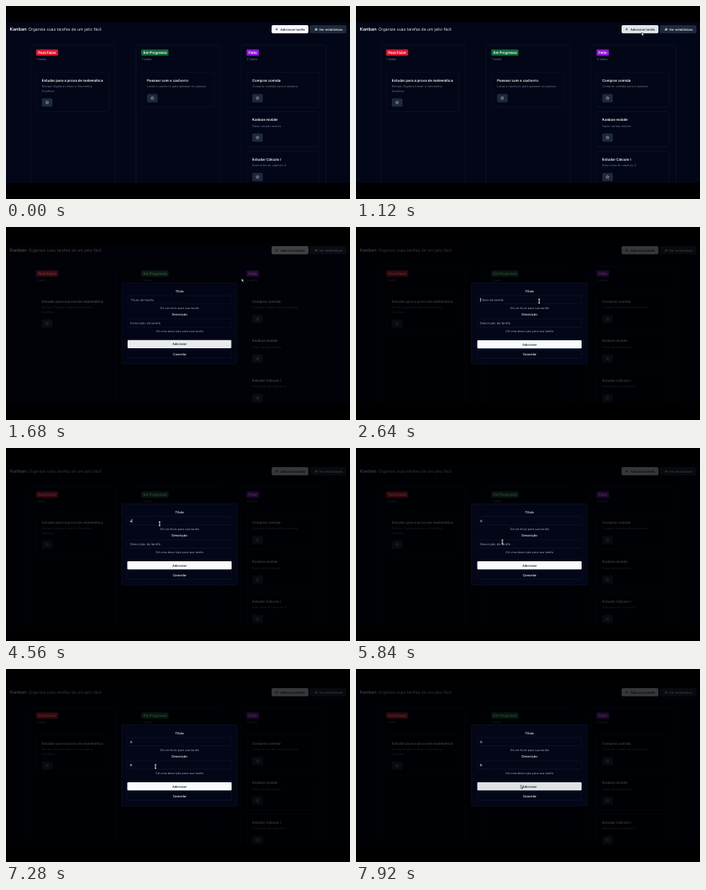
Animation, 430 px wide and 242 px high, one loop 8000 ms. Source, as an HTML page:

```html
<!DOCTYPE html>
<html lang="pt">
<head>
<meta charset="utf-8">
<title>Kanban</title>
<style>
  html, body { margin: 0; width: 100%; height: 100%; overflow: hidden; background: #000; }
  svg { display: block; width: 100%; height: 100%; }
  text { font-family: Inter, "Open Sans", sans-serif; text-rendering: geometricPrecision; }
</style>
</head>
<body>
<svg id="stage" viewBox="0 0 430 242"></svg>
<script>
const LOOP = 8000, STEP = 80;
const WHITE = '#f8fafc', NAVY = '#020617', SLATE = '#1e293b', MUTED = '#667388', HINT = '#94a0b4', LINE = '#121b31';

const rect = (x, y, w, h, fill, extra = '') =>
  `<rect x="${x}" y="${y}" width="${w}" height="${h}" fill="${fill}" ${extra}/>`;
const box = (x, y, w, h, r = 2) =>
  rect(x, y, w, h, NAVY, `rx="${r}" stroke="${LINE}" stroke-width=".5"`);
const text = (x, y, str, size, fill, weight = 400, extra = '') =>
  `<text x="${x}" y="${y}" font-size="${size}" fill="${fill}" font-weight="${weight}" ${extra}>${str}</text>`;
const centered = (y, str, size, fill, weight) =>
  text(217, y, str, size, fill, weight, 'text-anchor="middle"');
const line = (d, color, width = .5, extra = '') =>
  `<path d="${d}" fill="none" stroke="${color}" stroke-width="${width}" ${extra}/>`;

const star = (x, y) => {
  const points = Array.from({ length: 10 }, (_, i) => {
    const r = i % 2 ? .9 : 2.1, a = i * Math.PI / 5;
    return `${(x + r * Math.sin(a)).toFixed(2)} ${(y - r * Math.cos(a)).toFixed(2)}`;
  });
  return line(`M${points.join('L')}Z`, '#cbd5e1', .45);
};

function card(x, y, title, ...details) {
  const extra = (details.length - 1) * 5.5;
  return box(x, y, 91, 44 + extra)
    + text(x + 7, y + 11.6, title, 4.41, WHITE, 600)
    + details.map((d, i) => text(x + 7, y + 19 + i * 5.5, d, 3.78, MUTED)).join('')
    + rect(x + 7, y + 27.2 + extra, 13.3, 10.6, SLATE, 'rx="1.5"')
    + star(x + 13.6, y + 32.5 + extra);
}

const columns = [
  { x: 31, name: 'Para Fazer', color: '#de1833', width: 27.5, count: 1,
    cards: [['Estudar para a prova de matemática', 'Revisar Álgebra Linear e Geometria', 'Analítica']] },
  { x: 162.5, name: 'Em Progresso', color: '#15693a', width: 34, count: 1,
    cards: [['Passear com o cachorro', 'Levar o cachorro para passear no parque']] },
  { x: 294, name: 'Feito', color: '#9218d6', width: 15.6, count: 4,
    cards: [['Comprar comida', 'Comprar comida para a semana'],
            ['Kanban mobile', 'Fazer versão mobile'],
            ['Estudar Cálculo I', 'Exercícios do capítulo 4']] }
];

const board = columns.map(c => box(c.x, 49, 105.5, 190)
  + rect(c.x + 6.6, 54.4, c.width, 7.8, c.color, 'rx="1.3"')
  + text(c.x + 9.3, 59.9, c.name, 4.41, '#fff', 600)
  + text(c.x + 7, 67.8, `${c.count} tasks`, 3.9, MUTED)
  + c.cards.map((args, i) => card(c.x + 6.8, 83 + i * 49.5, ...args)).join('')).join('');

const header = text(4.8, 31, 'Kanban', 5.67, WHITE, 600)
  + text(28, 30.8, 'Organize suas tarefas de um jeito fácil', 5.07, '#e2e8f0')
  + rect(332, 24, 46, 10.3, WHITE, 'rx="1.7" id="add"')
  + line('M336.6 29.2h3.4M338.3 27.5v3.4', '#0f172a')
  + text(343, 30.6, 'Adicionar tarefa', 4, '#0f172a', 500)
  + rect(380, 24, 45.5, 10.3, SLATE, 'rx="1.7"')
  + line('M386.4 30.6v-1.6M387.6 30.6v-3M388.8 30.6v-2.2', WHITE, .8)
  + text(391.3, 30.6, 'Ver estatísticas', 4, WHITE, 500);

const field = (y, label, id, hint) => centered(y - 3.9, label, 4, WHITE, 500)
  + box(151.6, y, 130.4, 10.3, 1)
  + text(155, y + 6.5, '', 4.1, HINT, 400, `id="${id}"`)
  + centered(y + 16.5, hint, 3.72, HINT);

const modal = box(144.5, 70, 144.5, 101.7, .6)
  + field(86, 'Título', 'title', 'Dê um título para sua tarefa')
  + field(115.2, 'Descrição', 'description', 'Dê uma descrição para sua tarefa')
  + rect(151.6, 142, 130.4, 10.3, WHITE, 'rx="1" id="submit"')
  + centered(148.5, 'Adicionar', 4, '#0f172a', 500)
  + box(151.6, 154.2, 130.4, 10.3, 1)
  + centered(160.8, 'Cancelar', 4, WHITE, 500)
  + rect(0, 88.8, .5, 5, WHITE, 'id="caret"');

const popup = '<path d="M183.5 128l2-2 2 2z" fill="#dcd8dc"/>'
  + rect(180, 128, 57, 22.5, '#dcd8dc', 'rx="1"')
  + text(183.3, 135.6, 'Fazer versão mobile', 4.3, '#101014')
  + text(183.3, 145.4, 'Versão web do Kanban', 4.3, '#101014');

const stage = document.getElementById('stage');
stage.innerHTML = rect(0, 20.5, 430, 201.5, NAVY) + header + board
  + rect(0, 222, 430, 20, '#000')
  + rect(0, 0, 430, 242, '#000', 'id="overlay"')
  + `<g id="modal">${modal}</g><g id="popup">${popup}</g>`
  + '<g id="cursor"><path id="arrow" d="M0 0v4.2l1-.9.8 1.6.7-.3-.7-1.6h1.3z" fill="#fff" stroke="#000" stroke-width=".5"/>'
  + line('M-1-2.4h2M0-2.4v4.8M-1 2.4h2', '#fff', .8, 'id="beam"') + '</g>';

const el = {};
stage.querySelectorAll('[id]').forEach(node => el[node.id] = node);
const set = (node, name, value) => node.setAttribute(name, value);
const clamp = v => Math.max(0, Math.min(1, v));
const show = (node, visible) => set(node, 'visibility', visible ? 'visible' : 'hidden');

// Time, x, y of the pointer's hot spot.
const path = [
  [560, 370, 89], [720, 356, 60], [880, 357, 52], [1120, 357, 33], [1520, 357, 33],
  [1840, 232, 96], [2240, 232, 96], [2400, 229, 93], [2640, 229, 93], [2720, 200, 95],
  [2880, 192, 95], [5440, 192, 95], [5840, 183, 117.6], [7200, 183, 117.6],
  [7680, 206, 145.5], [LOOP, 206, 145.5]
];
function pointer(t) {
  const i = Math.max(1, path.findIndex(p => p[0] >= t));
  const [a, b] = [path[i - 1], path[i]];
  const k = clamp((t - a[0]) / (b[0] - a[0]));
  return [a[1] + (b[1] - a[1]) * k, a[2] + (b[2] - a[2]) * k];
}

const caretOn = [[2240, 3040], [3360, 3920], [4560, 5120], [5280, 5520]];
const titleAt = t => t < 3360 ? '' : t < 4640 ? 'a' : t < 5280 ? '' : 'A';

function fill(node, value, placeholder) {
  node.textContent = value || placeholder;
  set(node, 'fill', value ? WHITE : HINT);
}

function draw(t) {
  const open = t < 1520 ? 0 : clamp(.82 + .18 * (t - 1520) / 240);
  set(el.overlay, 'opacity', .76 * open);
  set(el.modal, 'opacity', open);
  const scale = .9 + .1 * open;
  set(el.modal, 'transform', `translate(217 121) scale(${scale}) translate(-217 -121)`);

  const title = titleAt(t);
  fill(el.title, title, 'Título da tarefa');
  fill(el.description, t >= 6240 ? 'B' : '', 'Descrição da tarefa');
  set(el.caret, 'x', title === 'A' ? 158 : title ? 157.5 : 155);
  show(el.caret, caretOn.some(([from, to]) => t >= from && t < to));
  set(el.popup, 'opacity', Math.min(clamp((t - 6160) / 240), clamp((6960 - t) / 280)));

  const [x, y] = pointer(t);
  const typing = t >= 1840 && t < 7360;
  set(el.cursor, 'transform', `translate(${x} ${y})`);
  show(el.arrow, t >= 560 && !typing);
  show(el.beam, typing);
  set(el.add, 'fill', t >= 1120 ? '#e2e5ea' : WHITE);
  set(el.submit, 'fill', t > 7280 && y > 141 ? '#e0e1e4' : WHITE);
}

const start = performance.now();
function tick() {
  const t = (performance.now() - start) % LOOP;
  draw(Math.floor(t / STEP) * STEP);
  requestAnimationFrame(tick);
}
tick();
</script>
</body>
</html>
```
